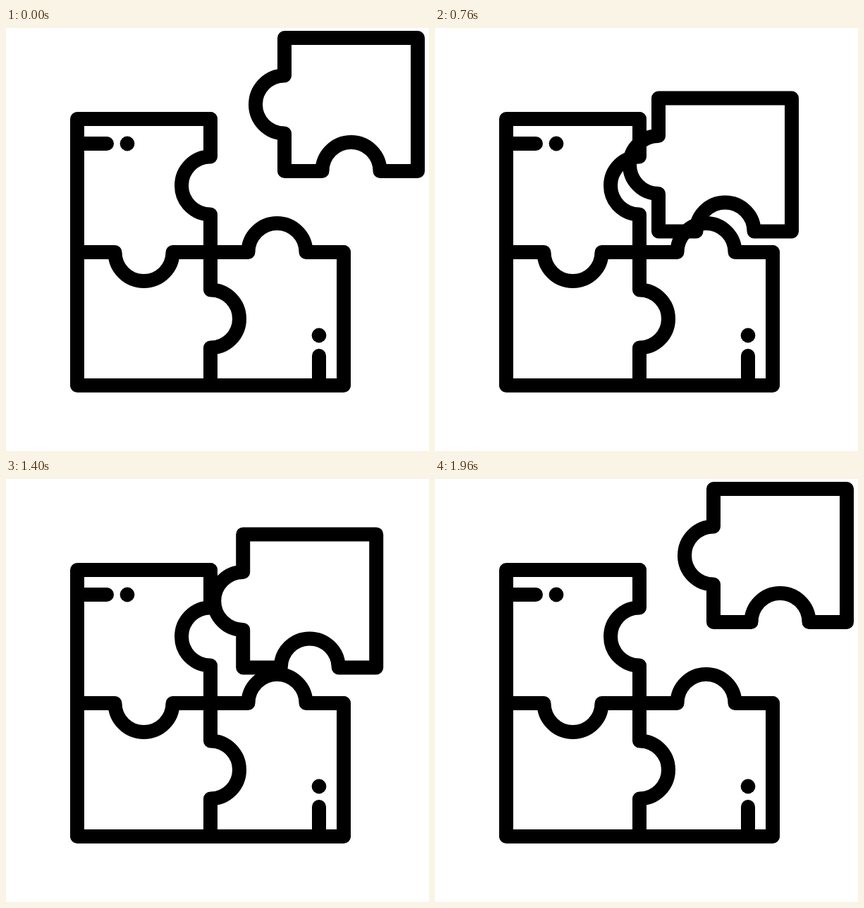
Write an HTML page that moves like this. It is 600 px wide and 600 px high and loops after 2000 ms.

```html
<!DOCTYPE html>
<html lang="en">
<head>
<meta charset="utf-8">
<title>Puzzle</title>
<style>
html, body { margin: 0; width: 100%; height: 100%; overflow: hidden; background: #fff; }
svg { display: block; width: 100%; height: 100%; }
path { fill: none; stroke: #000; stroke-width: 20; stroke-linecap: round; stroke-linejoin: round; }
</style>
</head>
<body>
<svg viewBox="0 0 600 600">
  <!-- outer edges, then the two wavy seams -->
  <path d="M290 129H101V507H479V318"/>
  <path d="M290 129V182.5a41 41 0 0 0 0 82V371.5a41 41 0 0 1 0 82V507"/>
  <path d="M101 318H154.5a41 41 0 0 0 82 0H343.5a41 41 0 0 1 82 0H479"/>
  <path d="M101 164H143M444 465V507"/>
  <circle cx="172" cy="164" r="10.4"/>
  <circle cx="444" cy="436" r="10.4"/>
  <path id="piece" d="M395 14V67.5a41 41 0 0 0 0 82V203H448.5a41 41 0 0 1 82 0H584V14Z"/>
</svg>
<script>
const piece = document.getElementById('piece');
const LOOP = 2000, TICK = 40, PEAK = 24, LAST = 47;

function draw(now) {
  const tick = Math.floor(now % LOOP / TICK);
  // the motion holds for one extra tick in each half of the loop
  const step = tick - (tick > 11) - (tick > 36);
  const p = step <= PEAK ? step / PEAK : (LAST - step) / (LAST - PEAK);
  piece.setAttribute('transform', `translate(${-104 * p} ${114 * p})`);
}

const start = performance.now();
function loop() {
  draw(performance.now() - start);
  requestAnimationFrame(loop);
}
loop();
</script>
</body>
</html>
```
